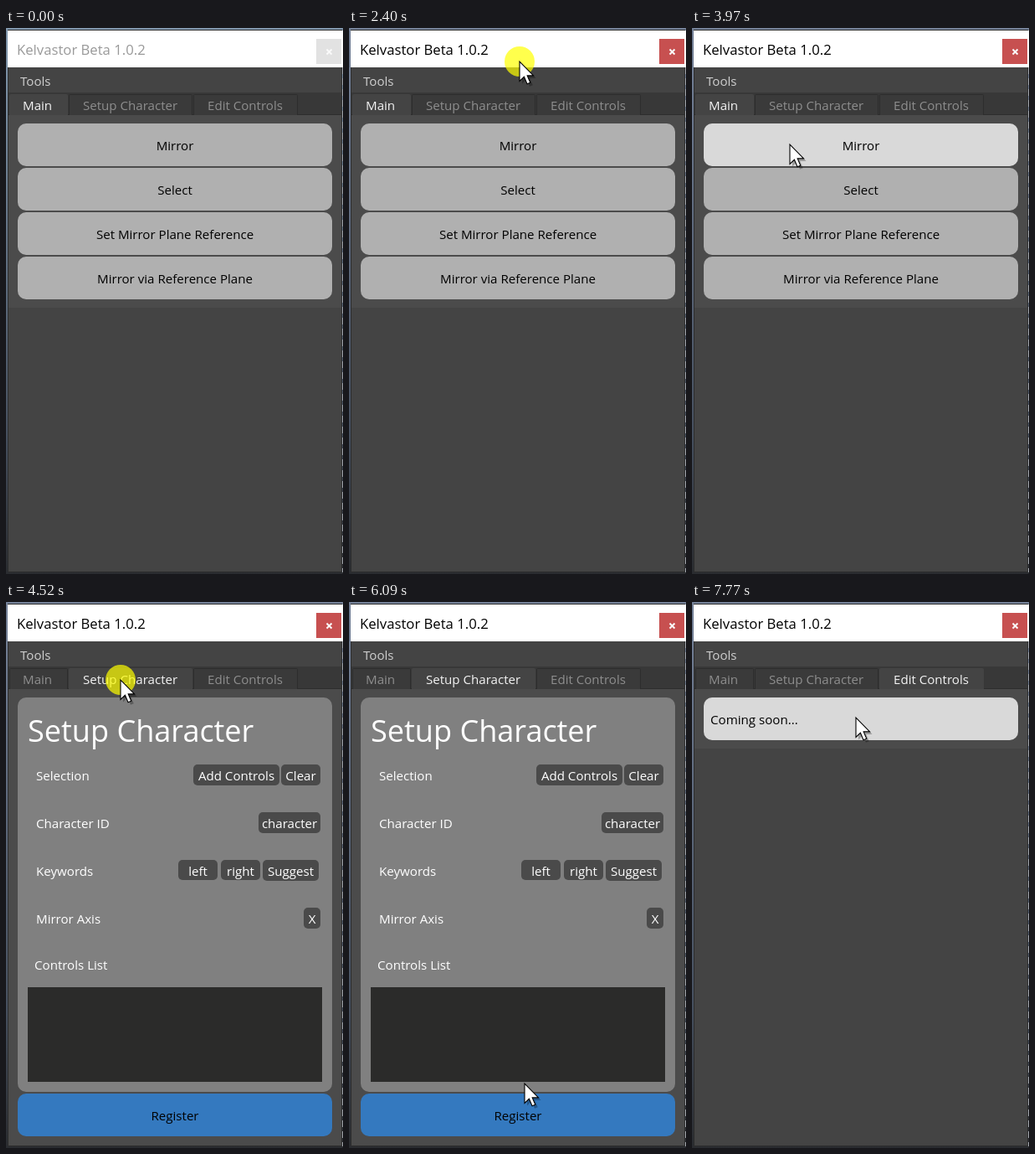
An HTML page that plays this animation: 403 by 652 pixels, repeating every 8 s.

```html
<!DOCTYPE html>
<html lang="en">
<head>
<meta charset="utf-8">
<title>Mirror tool</title>
<style>
html, body { margin: 0; width: 100%; height: 100%; overflow: hidden; background: #444; }
svg { display: block; width: 403px; height: 652px; font: 15.1px "Open Sans", "Noto Sans", sans-serif; }
text { white-space: pre; }
</style>
</head>
<body>
<svg id="stage" viewBox="0 0 403 652"></svg>
<script>
const LOOP = 8000;
const rect = (x1, y1, x2, y2, fill, r = 0, more = '') =>
  `<rect x="${x1}" y="${y1}" width="${x2 - x1}" height="${y2 - y1}" rx="${r}" fill="${fill}" ${more}/>`;
const text = (x, y, str, fill, more = '') => `<text x="${x}" y="${y}" fill="${fill}" ${more}>${str}</text>`;
const mid = 'text-anchor="middle"';
const group = (id, body) => `<g id="${id}">${body}</g>`;

// Buttons that change colour under the pointer
const hot = (y1, y2, base, over) =>
  rect(14, y1, 390, y2, base, 10, `class="hot" data-base="${base}" data-over="${over}"`);
const wide = (label, i) =>
  hot(114 + 53 * i, 165 + 53 * i, '#b0b0b0', '#d9d9d9') + text(202, 146 + 53 * i, label, '#000', mid);
const small = (x1, y1, x2, y2, label) =>
  rect(x1, y1, x2, y2, '#4a4a4a', 5) + text((x1 + x2) / 2, y1 + 19, label, '#fff', mid);

const tabs = [['Main', 4, 74, 20], ['Setup Character', 75, 223, 92], ['Edit Controls', 224, 349, 241]];
const tab = ([label, x1, x2, tx], i) =>
  rect(x1 + .5, 79.5, x2 - .5, 105, '#3a3a3a', 1, `id="tab${i}" stroke="#2d2d2d"`) +
  text(tx, 98, label, '#8e8e8e', `id="label${i}"`);

const main = rect(3, 104, 401, 334, '#4b4b4b') +
  ['Mirror', 'Select', 'Set Mirror Plane Reference', 'Mirror via Reference Plane'].map(wide).join('');

const setup = rect(3, 104, 401, 649, '#4b4b4b') + rect(14, 114, 390, 585, '#808080', 10) +
  text(26, 167, 'Setup Character', '#fff', 'font-size="36.1"') +
  ['Selection', 'Character ID', 'Keywords', 'Mirror Axis'].map((s, i) => text(36, 213 + 57 * i, s, '#fff')).join('') +
  text(34, 439, 'Controls List', '#fff') +
  small(224, 194, 327, 219, 'Add Controls') + small(329, 194, 376, 219, 'Clear') +
  small(302, 251, 376, 276, 'character') +
  small(206, 308, 253, 332, 'left') + small(257, 308, 304, 332, 'right') + small(307, 308, 374, 333, 'Suggest') +
  small(356, 365, 376, 390, 'X') +
  rect(26, 460, 378, 573, '#2b2b2a') +
  hot(587, 638, '#3479bf', '#5596d6') + text(202, 619, 'Register', '#000', mid);

const edit = rect(3, 104, 401, 175, '#4b4b4b') +
  hot(114, 165, '#b0b0b0', '#d9d9d9') + text(22, 146, 'Coming soon...', '#000');

const menu = rect(7.5, 77.5, 326.5, 129.5, '#525252', 0, 'stroke="#3a3a3a"') +
  rect(37, 81, 323, 104, '#5285a6', 0, 'id="row"') +
  text(42, 98, 'Save Character', '#eee') + text(42, 121, 'Load Character', '#eee');

const arrow = 'M0 0V23.4L5.4 18.3 9 26.8 12.8 25.2 9.2 16.9H16.6Z';
const $ = id => document.getElementById(id);

$('stage').innerHTML =
  `<defs><linearGradient id="edge" x2="0" y2="1"><stop id="edgeTop" offset="0"/>
    <stop offset=".75" stop-color="#46505f"/><stop offset="1" stop-color="#2a2c30"/></linearGradient></defs>` +
  rect(0, 0, 403, 652, 'url(#edge)') + rect(2, 2, 402, 650, '#2d2d2d') + rect(3, 47, 401, 649, '#444') +
  '<path d="M402.5 47V650" stroke="#a4a8ae" stroke-dasharray="8 5"/>' +
  rect(2, 3, 403, 47, '#fff') + text(13, 32, 'Kelvastor Beta 1.0.2', '#999', 'id="title" font-size="16.7"') +
  rect(371, 13, 401, 43, '#e2e2e2', 0, 'id="close"') +
  '<path d="M383.5 25.5l6 6m0-6l-6 6" stroke="#fafafa" stroke-width="2"/>' +
  rect(7, 48, 63, 77, '#5285a6', 0, 'id="tools"') + text(17, 69, 'Tools', '#d0d0d0') +
  rect(3, 77, 401, 104, '#383838') + rect(3, 103, 401, 104, '#2d2d2d') +
  tabs.map(tab).join('') +
  group('page0', main) + group('page1', setup) + group('page2', edit) + group('menu', menu) +
  group('pointer', `<circle id="ring" r="18" fill="#ff0" fill-opacity=".7"/>
    <path d="${arrow}" transform="translate(3 3)" fill="#000" opacity=".28"/>
    <path d="${arrow}" fill="#fff" stroke="#000" stroke-width="1.1"/>`);

// Moves: first step, last step, number of steps, resting point
const moves = [
  [260, 810, 7, 43, 77], [1090, 1650, 7, 150, 98], [2120, 2210, 2, 204, 40],
  [2490, 2870, 5, 190, 107], [3150, 3510, 5, 165, 335], [3790, 3970, 3, 117, 139],
  [4065, 4160, 2, 125, 100], [4340, 4430, 2, 137, 93], [4980, 5258, 4, 312, 194],
  [5350, 5720, 5, 230, 455], [5820, 6180, 5, 205, 605], [6460, 7110, 8, 271, 93],
  [7200, 7200, 1, 272, 92], [7670, 7770, 2, 196, 138]
];
const clicks = [[1000, 1090], [2400, 2490], [4520, 4610], [7200, 7300]];

function pointerAt(t) {
  let x = 215, y = 550;
  for (const [start, end, n, tx, ty] of moves) {
    if (t < start) break;
    const step = Math.min(n - 1, Math.floor((t - start) / (end - start || 1) * (n - 1) + .1));
    const p = (step + 1) / n;
    x += (tx - x) * p;
    y += (ty - y) * p;
  }
  return [x, y];
}

const show = (id, on) => $(id).setAttribute('display', on ? 'inline' : 'none');
const fill = (el, color) => el.setAttribute('fill', color);
const hots = [...document.querySelectorAll('.hot')];

function draw(t) {
  const [x, y] = pointerAt(t);
  const seen = t >= 260, active = t >= 1000, open = active && t < 2400;
  const page = t < 4520 ? 0 : t < 7200 ? 1 : 2;

  $('edgeTop').setAttribute('stop-color', active ? '#76839a' : '#8298ae');
  fill($('title'), active ? '#000' : '#999');
  fill($('close'), active ? '#c75050' : '#e2e2e2');
  tabs.forEach((_, i) => {
    show('page' + i, i === page);
    fill($('tab' + i), i === page ? '#444' : '#3a3a3a');
    $('tab' + i).setAttribute('stroke', i === page ? '#444' : '#2d2d2d');
    fill($('label' + i), i === page ? '#f4f4f4' : '#8e8e8e');
  });
  for (const el of hots) {
    const top = +el.getAttribute('y'), bottom = top + +el.getAttribute('height');
    const over = seen && !open && x > 14 && x < 390 && y >= top && y <= bottom;
    fill(el, over ? el.dataset.over : el.dataset.base);
  }
  show('tools', open || seen && x < 63 && y >= 48 && y <= 77);
  show('menu', open);
  show('row', x > 37 && y >= 81 && y < 104);
  show('pointer', seen);
  show('ring', clicks.some(([a, b]) => t >= a && t < b));
  $('pointer').setAttribute('transform', `translate(${x.toFixed(1)} ${y.toFixed(1)})`);
}

const begin = performance.now();
function tick() {
  draw((performance.now() - begin) % LOOP);
  requestAnimationFrame(tick);
}
tick();
</script>
</body>
</html>
```
